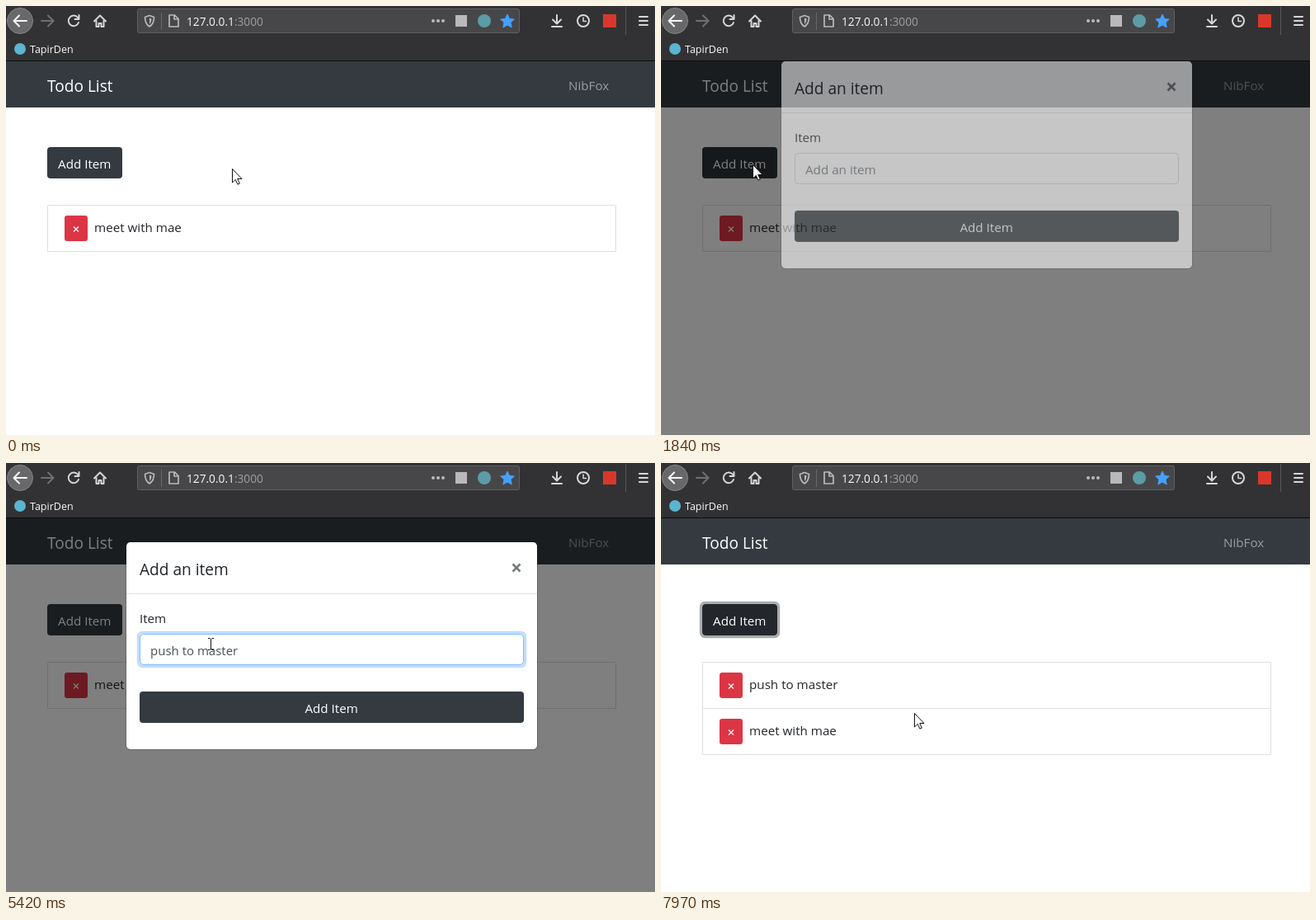
These frames come from a looping animation (787 px wide and 520 px high, 8 s). An HTML page:

```html
<!DOCTYPE html>
<html lang="en">
<head>
<meta charset="utf-8">
<title>Todo List</title>
<style>
html, body { margin: 0; width: 100%; height: 100%; overflow: hidden; background: #fff; }
svg { display: block; width: 787px; height: 520px; }
text { font: 15.2px "Open Sans", "Noto Sans", sans-serif; fill: #212529; white-space: pre; }
.big { font-size: 19.1px; }
.mid { text-anchor: middle; }
.light { fill: #fff; }
.ico { fill: none; stroke: #d7d7db; stroke-width: 2; stroke-linecap: round; stroke-linejoin: round; }
.edge { fill: none; stroke: #dfdfdf; }
.dark { fill: #343a40; }
.ring { fill: none; stroke: #52585d; stroke-opacity: .5; stroke-width: 3.2; }
.loop, .loop * { animation: 8s linear infinite; }

#shade { animation-name: shade; }
@keyframes shade {
  0%, 20.225% { opacity: 0; }
  22.1%, 83.1% { opacity: .5; }
  84.975%, 100% { opacity: 0; }
}
#modal { animation-name: appear, drop; }
@keyframes appear {
  0%, 21.963% { opacity: 0; }
  23.838%, 83.1% { opacity: 1; }
  84.975%, 100% { opacity: 0; }
}
@keyframes drop {
  0% { transform: translateY(-50px); }
  21.963% { transform: translateY(-50px); animation-timing-function: ease-out; }
  25.713% { transform: none; }
  83.1% { transform: none; animation-timing-function: ease-out; }
  86.85%, 100% { transform: translateY(-50px); }
}
#openBtn { animation-name: openBtn; }
@keyframes openBtn {
  0%, 16% { fill: #343a40; }
  17.9%, 21.9% { fill: #23272b; }
  23.8%, 87% { fill: #343a40; }
  88.9%, 100% { fill: #23272b; }
}
#openRing { animation-name: openRing; }
@keyframes openRing {
  0%, 87% { opacity: 0; }
  88.9%, 100% { opacity: 1; }
}
#saveBtn { animation-name: saveBtn; }
@keyframes saveBtn {
  0%, 78.6% { fill: #343a40; }
  80.5%, 100% { fill: #23272b; }
}
#saveRing { animation-name: saveRing; }
@keyframes saveRing {
  0%, 81.5% { opacity: 0; }
  83.3%, 100% { opacity: 1; }
}
#focus { animation-name: focus; }
@keyframes focus {
  0%, 29% { opacity: 0; }
  30.9%, 81.5% { opacity: 1; }
  83.3%, 100% { opacity: 0; }
}
#fresh { animation-name: fresh; }
@keyframes fresh {
  0%, 83.18% { opacity: 0; }
  83.19% { opacity: .01; animation-timing-function: ease-in; }
  95.69%, 100% { opacity: 1; }
}
#old { animation-name: shift; animation-timing-function: step-end; }
@keyframes shift {
  0% { transform: none; }
  83.19%, 100% { transform: translateY(56px); }
}
#oldTop { animation-name: oldTop; animation-timing-function: step-end; }
@keyframes oldTop {
  0% { opacity: 1; }
  83.19%, 100% { opacity: 0; }
}
#mouse { animation-name: mouse; animation-timing-function: ease-in-out; }
@keyframes mouse {
  0%, 6% { transform: translate(274px, 197px); }
  8.125%, 11.1% { transform: translate(252px, 196px); }
  18.125%, 23.75% { transform: translate(111px, 192px); }
  28.25%, 74.4% { transform: translate(248px, 219px); }
  81%, 98.875% { transform: translate(321px, 306px); }
  99.625%, 100% { transform: translate(307px, 303px); }
}
#arrow, #beam { animation-timing-function: step-end; }
#arrow { animation-name: arrow; }
@keyframes arrow {
  0%, 76.9%, 100% { opacity: 1; }
  27.2% { opacity: 0; }
}
#beam { animation-name: beam; }
@keyframes beam {
  0%, 76.9%, 100% { opacity: 0; }
  27.2% { opacity: 1; }
}
#press { animation-name: press; animation-timing-function: step-end; }
@keyframes press {
  0%, 20.1%, 30.2%, 83%, 100% { opacity: 0; }
  18.8%, 28.75%, 81.8% { opacity: .55; }
}
</style>
</head>
<body>
<svg viewBox="0 0 787 520">
  <defs>
    <clipPath id="view"><path d="M0 67H787V520H0z"/></clipPath>
    <g id="del">
      <rect x="71" y="254" width="28" height="31" rx="3.2" fill="#dc3545"/>
      <path d="M82 267.5l6 6m0-6l-6 6" stroke="#fff" stroke-width="1.2"/>
    </g>
  </defs>

  <!-- browser bars -->
  <rect width="787" height="67" fill="#323234"/>
  <rect y="66" width="787" height="1" fill="#0c0c0d"/>
  <circle cx="17" cy="18" r="15.5" fill="#68686a" stroke="#858587"/>
  <g class="ico">
    <path d="M25 18H10m6-6.500l-6.500 6.500 6.500 6.500" stroke="#f9f9fa"/>
    <path d="M43 18H57m-6-6.500l6.500 6.500-6.500 6.500" stroke="#707072"/>
    <path d="M87 14A6.300 6.300 0 1 0 88 20M88.500 11v5h-5"/>
    <path d="M107 18.500l7-7 7 7M109.500 18v7h3v-4h3v4h3v-7"/>
  </g>
  <rect x="159.500" y="3.500" width="463" height="29" rx="2" fill="#474749" stroke="#606062"/>
  <g class="ico" stroke-width="1.6" style="stroke:#b9b9bb;stroke-width:1.7">
    <path d="M174 11.500l5.500 2c0 6-1.500 9-5.500 11.500-4-2.500-5.500-5.500-5.500-11.500z"/>
    <path d="M174 14.500v7.500c1.600-1.500 2.300-3.500 2.500-6.500z" fill="#b9b9bb" stroke="none"/>
    <path d="M198 11h6.500l4.500 4.500V25h-11zM204 11.500v4.500h4.500"/>
  </g>
  <path d="M188.500 8V29" stroke="#68686a"/>
  <text x="219" y="24" style="font-size:13.7px;fill:#f9f9fa">127.0.0.1<tspan fill="#a0a0a2">:3000</tspan></text>
  <g fill="#b9b9bb">
    <circle cx="518" cy="18" r="2"/><circle cx="524" cy="18" r="2"/><circle cx="530" cy="18" r="2"/>
    <rect x="545" y="11" width="14" height="14"/>
  </g>
  <circle cx="580" cy="18" r="8" fill="#5c9ca6"/>
  <path d="M608 10l2.500 5.400 5.800.7-4.300 4 1.200 5.900-5.200-3-5.200 3 1.200-5.900-4.300-4 5.800-.7z" fill="#45a1ff" stroke="#45a1ff" stroke-linejoin="round"/>
  <g class="ico">
    <path d="M668 11v10m-5-4.500l5 5 5-5M662 25h12"/>
    <circle cx="700" cy="18" r="7"/><path d="M700 14v4.500h3.500" stroke-width="1.5"/>
    <path d="M768 13h10m-10 5h10m-10 5h10"/>
  </g>
  <rect x="724" y="10" width="16" height="16" fill="#d8382c"/>
  <path d="M751.500 1V35" stroke="#59595b"/>
  <circle cx="17" cy="52" r="7" fill="#5bb4d0"/>
  <text x="29" y="57" style="font-size:12.500px;fill:#f9f9fa">TapirDen</text>

  <g class="loop" clip-path="url(#view)">
    <!-- page -->
    <rect y="67" width="787" height="453" fill="#fff"/>
    <rect class="dark" y="67" width="787" height="56"/>
    <text class="big light" x="50" y="104">Todo List</text>
    <text x="682" y="102" style="fill:#999da0">NibFox</text>
    <rect id="openRing" class="ring" x="48.400" y="169.400" width="94.200" height="41.200" rx="5"/>
    <rect id="openBtn" class="dark" x="50" y="171" width="91" height="38" rx="4"/>
    <text class="mid light" x="95.300" y="197">Add Item</text>
    <g id="fresh">
      <rect class="edge" x="50.500" y="241.500" width="689" height="56"/>
      <use href="#del"/>
      <text x="107" y="274">push to master</text>
    </g>
    <g id="old">
      <path id="oldTop" class="edge" d="M51 241.500H739"/>
      <path class="edge" d="M50.500 242V297.500H739.500V242"/>
      <use href="#del"/>
      <text x="107" y="274">meet with mae</text>
    </g>
    <rect id="shade" y="67" width="787" height="453"/>

    <!-- dialog -->
    <g id="modal">
      <rect x="146" y="96" width="498" height="251" rx="4.800" fill="#fff"/>
      <rect x="145.500" y="95.500" width="499" height="252" rx="5" fill="none" stroke="#000" stroke-opacity=".2"/>
      <text class="big" x="162" y="136">Add an item</text>
      <path d="M614.500 122.500l9 9m0-9l-9 9" stroke="#757b80" stroke-width="2.600"/>
      <path d="M146 158.500H644" stroke="#dee2e6"/>
      <text x="162" y="194">Item</text>
      <rect x="162.500" y="207.500" width="465" height="37" rx="4" fill="#fff" stroke="#ced4da"/>
      <g id="focus" fill="none">
        <rect x="160.400" y="205.400" width="469.200" height="41.200" rx="5" stroke="#007bff" stroke-opacity=".25" stroke-width="3.200"/>
        <rect x="162.500" y="207.500" width="465" height="37" rx="4" stroke="#80bdff"/>
      </g>
      <text id="hint" x="175" y="233" style="fill:#6c757d">Add an item</text>
      <text id="entry" x="175" y="233" style="fill:#495057;font-size:15px"></text>
      <rect id="caret" x="175" y="216" width="1" height="21" fill="#343a40"/>
      <rect id="saveRing" class="ring" x="160.400" y="275.400" width="469.200" height="41.200" rx="5"/>
      <rect id="saveBtn" class="dark" x="162" y="277" width="466" height="38" rx="4"/>
      <text class="mid light" x="394.600" y="303">Add Item</text>
      <g id="suggest">
        <rect x="161.500" y="245.500" width="468" height="24" fill="#fff" stroke="#b8b8b8"/>
        <text x="167" y="262" style="font-size:13px">push to main</text>
      </g>
    </g>
  </g>

  <g class="loop">
    <g id="mouse">
      <circle id="press" cx="-2" r="12" fill="#ff0"/>
      <path id="arrow" d="M.500 .500V17l3.800-3.600 2.600 5.800 2.400-1.100-2.600-5.600H12z" fill="#fff" stroke="#111"/>
      <path id="beam" d="M-3 -6.500H-.500M1.500 -6.500H4M.500 -6V7M-3 7.500H-.500M1.500 7.500H4" fill="none" stroke="#111"/>
    </g>
  </g>
</svg>
<script>
const el = id => document.getElementById(id);
const hint = el("hint"), entry = el("entry"), caret = el("caret"), suggest = el("suggest");
const phrase = "push to master";
const keys = [3150, 3390, 3570, 3700, 3880, 4090, 4120, 4320, 4440, 4560, 4680, 4860, 5000, 5140];
const caretOn = [[2320, 2820], [3150, 5420], [5960, 6540]];
const show = (node, on) => node.setAttribute("visibility", on ? "visible" : "hidden");
let start;

function draw(now) {
  start ??= now;
  const t = (now - start) % 8000;
  const count = keys.filter(k => k <= t).length;
  const typed = phrase.slice(0, count);
  if (entry.textContent !== typed) entry.textContent = typed;
  const width = count ? entry.getComputedTextLength() : 0;
  caret.setAttribute("x", 175 + Math.round(width));
  show(hint, !count);
  show(caret, caretOn.some(([a, b]) => t >= a && t < b));
  show(suggest, t >= 3210 && t < 4680);
  requestAnimationFrame(draw);
}
requestAnimationFrame(draw);
</script>
</body>
</html>
```
